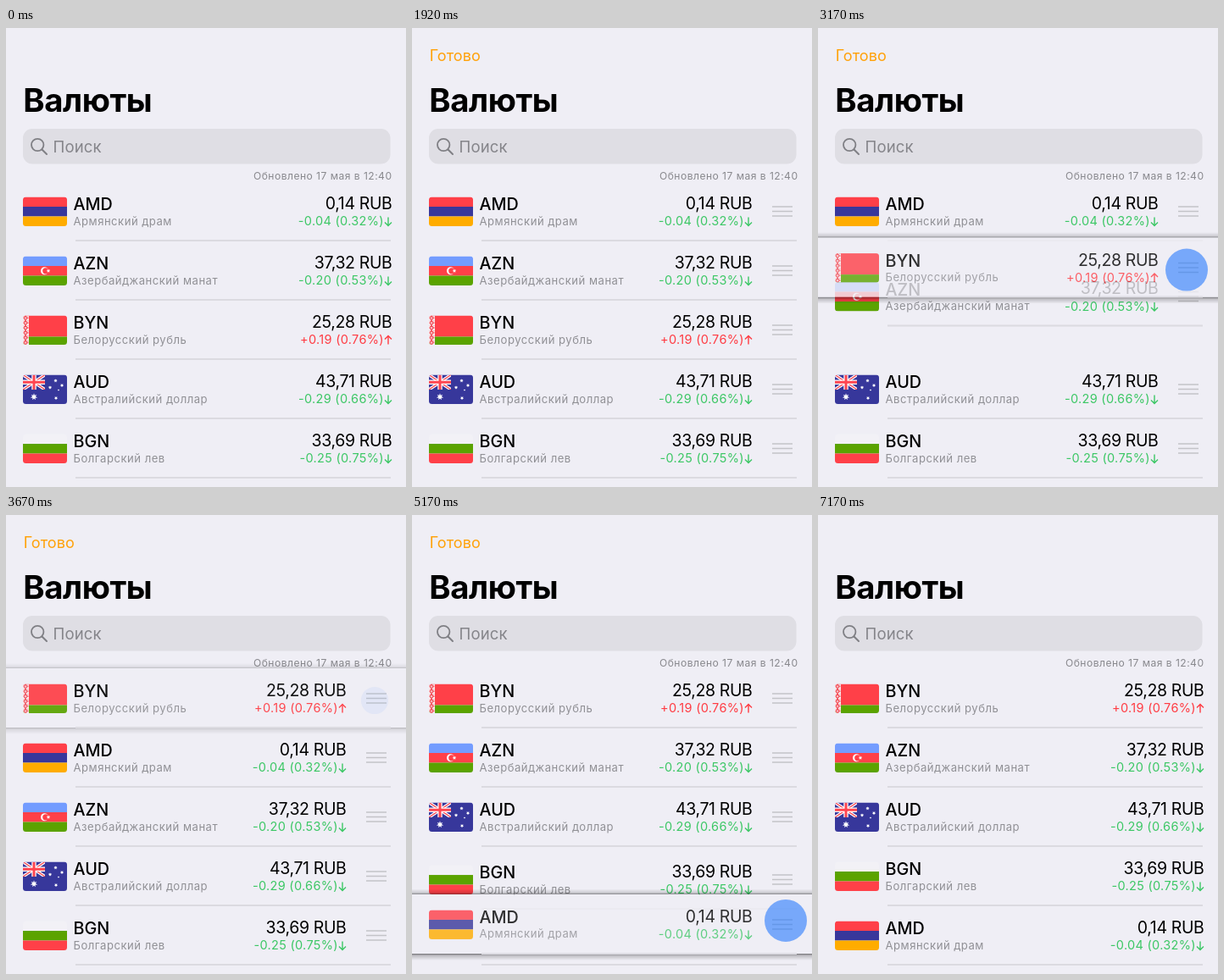
Recreate the animation shown at these times as an HTML page. Size 472 by 542 pixels, loop 7.26 s.

```html
<!DOCTYPE html>
<html lang="ru">
<head>
<meta charset="utf-8">
<title>Валюты</title>
<style>
html, body { margin: 0; width: 100%; height: 100%; overflow: hidden; background: #efeef5; }
svg { display: block; width: 472px; height: 542px; font-family: Inter, "Liberation Sans", sans-serif; }
.title { font-size: 38.3px; font-weight: 700; letter-spacing: -.45px; }
.search { font-size: 18.6px; letter-spacing: .1px; fill: #85858a; }
.updated { font-size: 12.1px; letter-spacing: .47px; fill: #88888d; text-anchor: end; }
.done { font-size: 18.1px; letter-spacing: .05px; fill: #ffa20a; }
.code { font-size: 19.8px; font-weight: 500; }
.name { font-size: 13.1px; letter-spacing: .5px; fill: #909095; }
.price { font-size: 19.5px; letter-spacing: -.36px; text-anchor: end; }
.change { font-size: 14.5px; letter-spacing: .3px; text-anchor: end; }
.line { stroke: #dbdae0; stroke-width: 2; }
.handle { stroke: #c3c3c8; stroke-width: 1.5; }
</style>
</head>
<body>
<svg viewBox="0 0 472 542">
  <defs>
    <linearGradient id="below" x1="0" y1="0" x2="0" y2="1">
      <stop offset="0" stop-opacity=".65"/>
      <stop offset=".3" stop-opacity=".25"/>
      <stop offset="1" stop-opacity="0"/>
    </linearGradient>
    <linearGradient id="above" x1="0" y1="1" x2="0" y2="0">
      <stop offset="0" stop-opacity=".6"/>
      <stop offset=".3" stop-opacity=".18"/>
      <stop offset="1" stop-opacity="0"/>
    </linearGradient>
    <pattern id="ornament" width="6" height="5.8" patternUnits="userSpaceOnUse">
      <path d="M3 .4 5.4 2.9 3 5.4 .6 2.9Z M0 0h1M5 0h1M2.500 2.900h1" fill="none" stroke="#f23c48" stroke-width="1.100"/>
    </pattern>
    <clipPath id="flagClip"><rect width="52" height="34.5" rx="3.5"/></clipPath>
    <clipPath id="cantonClip"><rect width="26" height="17.5"/></clipPath>
  </defs>
  <rect width="472" height="542" fill="#efeef5"/>
  <text class="done" id="done" x="20.7" y="38.5">Готово</text>
  <text class="title" x="20.3" y="99">Валюты</text>
  <rect x="20" y="119" width="433.500" height="41.500" rx="11" fill="#dfdee4"/>
  <path d="M42.500 143.500 48 149" stroke="#7f7f84" stroke-width="2" stroke-linecap="round"/>
  <circle cx="37.200" cy="138" r="7.200" fill="none" stroke="#7f7f84" stroke-width="1.800"/>
  <text class="search" x="55.500" y="146.500">Поиск</text>
  <text class="updated" x="455.500" y="178.500">Обновлено 17 мая в 12:40</text>
  <path class="line" d="M82 531H454"/>
  <g id="rows"></g>
  <g id="action">
    <rect y="321" width="90" height="69.500" fill="#0068ff"/>
    <path d="M30.500 350.500h24.500m-24.500 4h24.500m-24.500 4h24.500m-24.500 4h24.500" stroke="#fff" stroke-width="1.300"/>
  </g>
  <circle id="touch" fill="#0065ff"/>
</svg>
<script>
const LOOP = 7260, STEP = 250 / 3, ROW = 70;
const $ = id => document.getElementById(id);
const clamp = x => Math.max(0, Math.min(1, x));
const ramp = (t, start, length) => (1 - Math.cos(Math.PI * clamp((t - start) / length))) / 2;
const easeOut = (t, start, length) => 1 - (1 - clamp((t - start) / length)) ** 3;

const band = (y, h, fill) => `<rect y="${y}" width="52" height="${h}" fill="${fill}"/>`;
const stripes = (...colors) => colors.map((c, i) => band(i * 11.5, 11.5, c)).join('');

function star(cx, cy, r, points) {
  const corners = Array.from({ length: points * 2 }, (_, i) => {
    const a = Math.PI * i / points - Math.PI / 2, d = i % 2 ? r * .45 : r;
    return (cx + d * Math.cos(a)).toFixed(2) + ',' + (cy + d * Math.sin(a)).toFixed(2);
  });
  return `<polygon points="${corners.join(' ')}" fill="#fff"/>`;
}

const canton = [
  ['M0 0 26 17.5M26 0 0 17.5', '#fff', 3.6],
  ['M0 0 26 17.5M26 0 0 17.5', '#ff4550', 1.3],
  ['M13 0V17.5M0 8.75H26', '#fff', 5.4],
  ['M13 0V17.5M0 8.75H26', '#ff4550', 3]
].map(([d, color, w]) => `<path d="${d}" stroke="${color}" stroke-width="${w}"/>`).join('');

const flags = {
  AMD: stripes('#ff3f48', '#38379b', '#ffac00'),
  AZN: stripes('#739cff', '#ff4048', '#5ba300') +
    '<circle cx="25.500" cy="17.300" r="4.500" fill="#fff"/><circle cx="26.800" cy="17.300" r="3.600" fill="#ff4048"/>' +
    star(30, 17.3, 2.4, 8),
  BYN: band(0, 25, '#ff4048') + band(25, 9.5, '#5ba300') +
    '<rect width="7" height="34.500" fill="#f8f4f6"/><rect x=".5" width="6" height="34.500" fill="url(#ornament)"/>',
  AUD: band(0, 34.5, '#37379b') + `<g clip-path="url(#cantonClip)">${canton}</g>` +
    star(13, 26, 4.2, 7) + star(38.5, 7, 2.3, 7) + star(32, 15, 2.3, 7) +
    star(46, 12.5, 2.3, 7) + star(39, 27.5, 2.3, 7) + star(42, 18, 1.3, 5),
  BGN: stripes('#f2f1f6', '#5ba300', '#ff4048')
};

const arrow = up => up
  ? 'M451 233.500V223.500M447 227.500 451 223.500 455 227.500'
  : 'M451 223.500V233.500M447 229.500 451 233.500 455 229.500';

function makeRow([code, name, price, change]) {
  const up = change[0] === '+', color = up ? '#ff3b42' : '#3cc765';
  const g = document.createElementNS('http://www.w3.org/2000/svg', 'g');
  g.innerHTML = `
    <g class="lift">
      <rect y="174.500" width="472" height="6.500" fill="url(#above)"/>
      <rect y="251" width="472" height="8" fill="url(#below)"/>
      <rect y="181" width="472" height="70" fill="#efeef5"/>
    </g>
    <g class="content">
      <g transform="translate(20 199.500)" clip-path="url(#flagClip)">${flags[code]}</g>
      <text class="code" x="79.500" y="215.200">${code}</text>
      <text class="name" x="79.500" y="232.500">${name}</text>
      <path class="line" d="M82 251H454"/>
      <g class="values">
        <text class="price" x="455.500" y="214">${price} RUB</text>
        <text class="change" x="445.800" y="233.300" fill="${color}">${change}</text>
        <path d="${arrow(up)}" fill="none" stroke="${color}" stroke-width="1.400"/>
      </g>
    </g>
    <path class="handle" d="M425 211H449M425 216.500H449M425 222H449"/>`;
  $('rows').append(g);
  const part = name => g.querySelector('.' + name);
  return { g, lift: part('lift'), content: part('content'), values: part('values'), handle: part('handle') };
}

const rows = Object.fromEntries([
  ['AMD', 'Армянский драм', '0,14', '-0.04 (0.32%)'],
  ['AZN', 'Азербайджанский манат', '37,32', '-0.20 (0.53%)'],
  ['BYN', 'Белорусский рубль', '25,28', '+0.19 (0.76%)'],
  ['AUD', 'Австралийский доллар', '43,71', '-0.29 (0.66%)'],
  ['BGN', 'Болгарский лев', '33,69', '-0.25 (0.75%)']
].map(data => [data[0], makeRow(data)]));

const move = (el, x, y) => el.setAttribute('transform', `translate(${x.toFixed(2)} ${y.toFixed(2)})`);
const fade = (el, a) => el.setAttribute('opacity', a.toFixed(3));

function slots(t) {
  return {
    AMD: ramp(t, 3260, 250) + 3 * ramp(t, 4155, 1205),
    AZN: 1 + ramp(t, 3052, 250) - ramp(t, 4480, 250),
    BYN: 2 - 2 * ramp(t, 2860, 595),
    AUD: 3 - ramp(t, 4720, 250),
    BGN: 4 - ramp(t, 4930, 280)
  };
}

function drawTouch(t, slot) {
  const rowY = code => 216 + ROW * slot[code];
  const touches = [
    [480, 950, 400 - 86 * ramp(t, 600, 350), 356],
    [1300, 1490, 432, 356],
    [2600, 3560, 435, rowY('BYN') + 3],
    [3860, 5500, 441, rowY('AMD') - 4],
    [6670, 6910, 37, 31.5]
  ];
  const [from, to, x, y] = touches.find(([a, b]) => t >= a && t < b + 120) || [0, -200, 0, 0];
  const power = easeOut(t, from, 150) * (1 - clamp((t - to) / 120));
  const dot = $('touch');
  dot.setAttribute('cx', x);
  dot.setAttribute('cy', y);
  dot.setAttribute('r', 15 + 10 * power);
  fade(dot, .5 * power);
}

function draw(t) {
  const slot = slots(t);
  const edit = ramp(t, 1580, 330) - easeOut(t, 6860, 300);
  const swipe = -86 * (ramp(t, 600, 380) - ramp(t, 1560, 300));
  const lifted = {
    BYN: ramp(t, 2720, 150) - ramp(t, 3550, 200),
    AMD: ramp(t, 4030, 150) - ramp(t, 5490, 200)
  };
  for (const code in rows) {
    const { g, lift, content, values, handle } = rows[code];
    const up = lifted[code] || 0;
    move(g, 0, ROW * slot[code]);
    fade(g, 1 - .2 * up);
    fade(lift, up);
    move(content, code === 'BYN' ? swipe : 0, 0);
    move(values, -54 * edit, 0);
    move(handle, 16 * (1 - edit), 0);
    fade(handle, edit);
  }
  const top = rows[t < 3800 ? 'BYN' : 'AMD'].g;
  if ($('rows').lastChild !== top) $('rows').append(top);
  fade($('done'), edit);
  fade($('action'), swipe < -.1 ? 1 : 0);
  move($('action'), 476 + swipe, 0);
  drawTouch(t, slot);
}

const began = performance.now();
function tick() {
  const t = (performance.now() - began) % LOOP;
  // The picture advances at twelve steps a second.
  draw(Math.min(86, Math.floor((t + 3.5) / STEP)) * STEP);
  requestAnimationFrame(tick);
}
tick();
</script>
</body>
</html>
```
